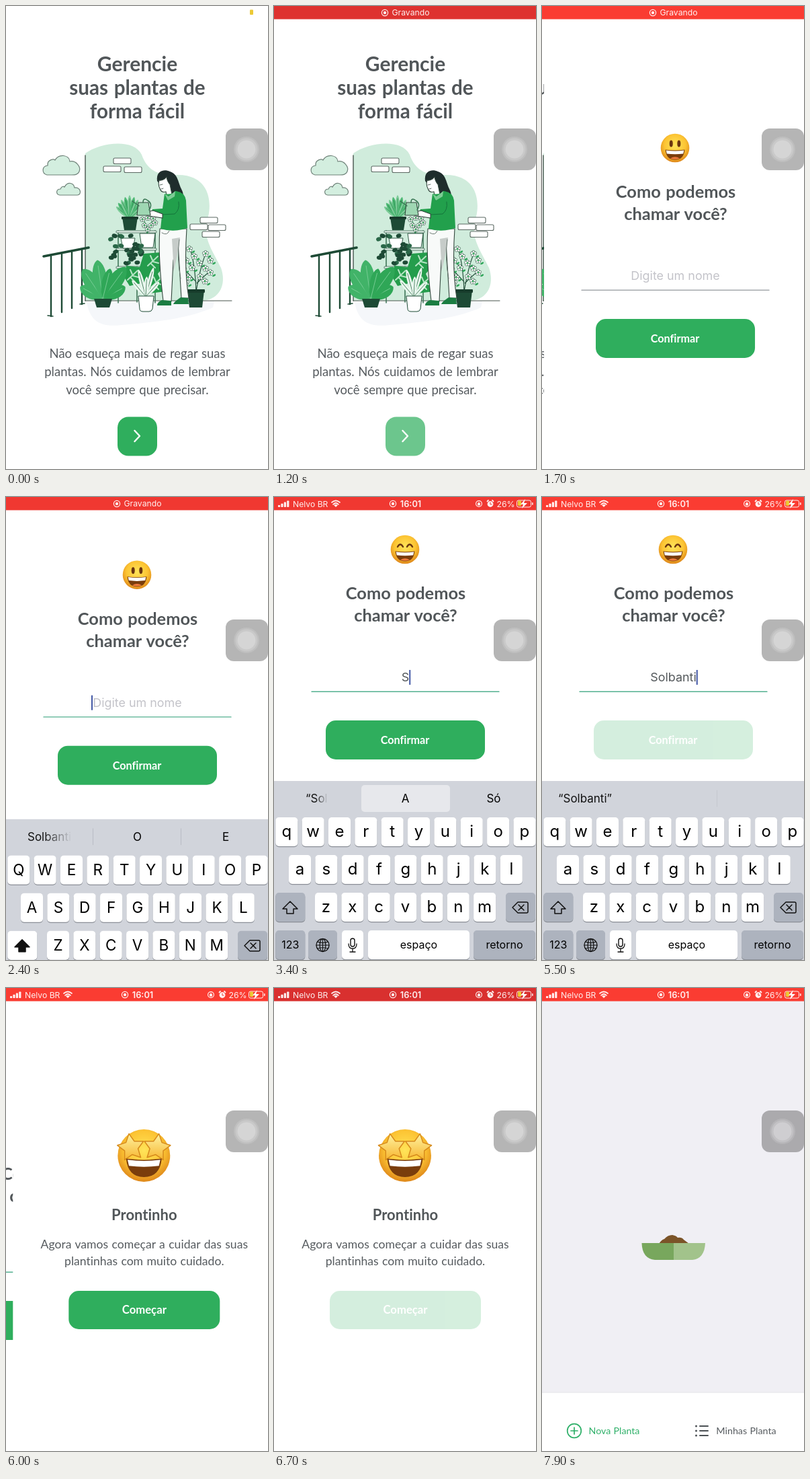
Recreate the animation shown at these times as an HTML page. Size 390 by 688 pixels, loop 8000 ms.

```html
<!DOCTYPE html>
<html lang="pt-BR">
<head>
<meta charset="utf-8">
<title>Plantas</title>
<style>
html, body { margin: 0; width: 100%; height: 100%; overflow: hidden; background: #fff }
svg { display: block; width: 100vw; height: 100vh }
text { font-family: Inter, "Noto Sans", sans-serif; text-anchor: middle }
.geo { font-family: Lato, "Open Sans", sans-serif; font-variant-ligatures: none; word-spacing: .05em; fill: #565b5f }
.bold { font-weight: 700; fill: #515659 }
.btn { font-weight: 700; fill: #fff }
.green { fill: #2fb069 }
.start { text-anchor: start }
</style>
</head>
<body>
<svg id="stage" viewBox="0 0 390 688" xmlns="http://www.w3.org/2000/svg"></svg>
<script>
const GREEN = '#2fae5d', DARK = '#1d4a35', NAME = 'Solbanti';
const stage = document.getElementById('stage');

// Markup helpers
const rect = (x, y, w, h, r, fill, more = '') =>
  `<rect x="${x}" y="${y}" width="${w}" height="${h}" rx="${r}" fill="${fill}" ${more}/>`;
const circle = (x, y, r, fill, more = '') => `<circle cx="${x}" cy="${y}" r="${r}" fill="${fill}" ${more}/>`;
const oval = (x, y, rx, ry, fill, more = '') =>
  `<ellipse cx="${x}" cy="${y}" rx="${rx}" ry="${ry}" fill="${fill}" ${more}/>`;
const path = (d, fill, more = '') => `<path d="${d}" fill="${fill}" ${more}/>`;
const line = (d, color, w = 1, more = '') =>
  `<path d="${d}" fill="none" stroke="${color}" stroke-width="${w}" stroke-linecap="round" stroke-linejoin="round" ${more}/>`;
const text = (s, x, y, size, more = '') => `<text x="${x}" y="${y}" font-size="${size}" ${more}>${s}</text>`;
const geo = (s, x, y, size, style = '') => text(s, x, y, size, `class="geo ${style}"`);
const group = (id, body, more = '') => `<g id="${id}" ${more}>${body}</g>`;
const button = (id, x, y, w, h, r, body) => group(id, rect(x, y, w, h, r, GREEN) + body);
const page = (id, bg, body) => group(id, rect(0, 0, 390, 688, 0, bg) + body);

function leaf(x, y, angle, len, width, fill, vein) {
  const d = `M0 0C${-width} ${-len * .35} ${-width * .8} ${-len * .9} 0 ${-len}C${width * .8} ${-len * .9} ${width} ${-len * .35} 0 0Z`;
  return `<g transform="translate(${x} ${y}) rotate(${angle})">${path(d, fill)}` +
    (vein ? line(`M0 0V${-len * .85}`, vein, .8) : '') + '</g>';
}

function flower(x, y, r = 2.3) {
  let s = '';
  for (let i = 0; i < 5; i++) {
    const a = i * Math.PI * .4;
    s += circle(x + r * Math.sin(a), y - r * Math.cos(a), r * .75, '#fff', `stroke="${DARK}" stroke-width=".6"`);
  }
  return s + circle(x, y, r * .5, '#37b45f');
}

function random(seed) {
  return () => (seed = seed * 16807 % 2147483647) / 2147483647;
}

function scenery() {
  const cloud = d => path(d, '#d3eedf', 'stroke="#6f8279" stroke-width="1.2"');
  const brick = ([x, y]) => rect(x, y, 26, 8.5, 2, '#fff', 'stroke="#5b6862" stroke-width="1.1"');
  const posts = [[67, 370, 461], [83, 367, 455], [98, 364, 449], [113, 361, 443]];
  return path('M120 440C125 468 140 478 172 474C215 470 268 466 308 448L310 439Z', '#f5f7fa') +
    path('M118 219C140 203 190 196 202 221C211 246 228 252 256 251C300 251 307 287 301 313C291 344 307 362 320 389C329 415 317 438 290 438H118Z', '#d0ecdc') +
    cloud('M61 251C53 249 53 238 62 237C61 228 71 227 73 229C79 219 94 221 95 231C104 229 112 239 109 246C107 251 102 251 98 251Z') +
    cloud('M80 281C74 280 74 272 81 272C83 267 86 268 87 269C92 260 101 263 102 270C112 269 113 281 106 281Z') +
    [[160, 226], [145, 238], [176, 239], [289, 314], [274, 324], [301, 325], [292, 335]].map(brick).join('') +
    line('M118 222V438', '#46544d', 1.4) + line('M118 438H336', '#46544d') +
    posts.map(([x, a, b]) => line(`M${x} ${a}V${b}`, DARK, 2.4)).join('') +
    line('M56 372L123 359', DARK, 3.6) + line('M62 460L70 461M110 443L117 442', DARK, 1.5);
}

function shelfPlants() {
  const rnd = random(77);
  const shelf = y => rect(164, y, 60, 3, 1, '#e9f6ee', `stroke="${DARK}" stroke-width=".7"`);
  const pot = d => path(d, '#fff', `stroke="${DARK}" stroke-width=".9"`);
  let s = line('M167 334V441M222 334V441M195 387V440', '#3f7558', 1.6) + [334, 360, 387].map(shelf).join('');
  for (let i = -4; i <= 4; i++)
    s += leaf(184, 316, i * 12, 35 - Math.abs(i) * 2, 4.5, i % 2 ? '#4fb975' : '#7bcb97', '#278e4d');
  s += path('M173 314H196L193 333H176Z', DARK) + rect(172, 313, 25, 4, 1, '#173b2b') +
    line('M210 339Q211 328 205 318M210 339Q214 325 219 316M210 339V326', '#25894a');
  [[203, 317], [211, 315], [219, 316], [206, 326], [216, 326], [222, 322], [211, 332]].forEach(p => s += flower(...p));
  s += pot('M199 338H222L219 359H202Z') + pot('M171 345H192L189 360H174Z');
  // trailing vine
  for (let i = 0; i < 38; i++) {
    const x = +(156 + rnd() * 46).toFixed(1), y = +(341 + rnd() * 42).toFixed(1);
    const tilt = Math.round(rnd() * 60 - 30);
    if (Math.abs(x - 181) > 8 || y < 347 || y > 361)
      s += oval(x, y, 4, 3, i % 3 ? DARK : '#2a6848', `transform="rotate(${tilt} ${x} ${y})"`);
  }
  return s;
}

function floorPlants() {
  const twig = ([x, y]) => line(`M${x - 8} ${y + 6}L${x + 7} ${y - 8}M${x} ${y}L${x - 4} ${y - 9}M${x} ${y}L${x + 8} ${y + 2}M${x - 3} ${y + 3}L${x + 3} ${y + 9}`, '#b5e4c4', 2);
  let s = path('M179 386L199 388L205 368L231 366L233 389L226 398L238 424L214 427L205 411L184 416L176 403Z', '#249d4c') +
    [[189, 401], [219, 380], [224, 412]].map(twig).join('');
  [[-62, 38, 14], [62, 38, 14], [-34, 53, 16], [36, 58, 16], [-8, 58, 15], [14, 46, 11]]
    .forEach(([a, l, w], i) => s += leaf(144, 435, a, l, w, i % 2 ? '#2fa757' : '#41b368', '#7fd09b'));
  s += path('M131 435H158L154 448H135Z', DARK);
  [[-40, 32], [-15, 42], [15, 45], [42, 30], [3, 30]].forEach(([a, l]) => s += leaf(208, 432, a, l, 5, '#eaf7ef', '#37734f'));
  s += path('M197 431H220L218 450Q217 454 213 454H204Q199 454 199 450Z', '#fff', `stroke="${DARK}" stroke-width="1"`) +
    line('M283 424Q282 390 275 363M283 424Q290 385 297 369M283 410Q272 398 264 390M284 412Q295 401 304 394M281 392L268 378', DARK, 1.1);
  [[273, 361], [280, 372], [297, 368], [268, 378], [288, 382], [304, 378], [264, 391], [277, 389], [297, 390], [304, 396], [271, 403], [289, 402], [268, 411], [296, 409]]
    .forEach(([x, y]) => s += flower(x, y, 2.7) + leaf(x + 3, y + 6, 60, 6, 2, '#2ca557'));
  return s + path('M270 423H295L292 448H273Z', DARK) + rect(269, 421, 27, 5, 1, '#173b2b');
}

function woman() {
  const ink = 'stroke="#33473d" stroke-width="1.1"';
  return path('M229 331Q226 372 234 438L246 439L249 378L256 352L261 434L272 434Q265 390 269 331Z', '#f8faf9', ink) +
    path('M247 346L259 344Q255 374 249 395L249 380Z', '#c6ccc9') + line('M258 347Q254 375 260 405M232 337Q240 342 243 334', '#6b7972', 1) +
    path('M232 437L246 438V445H225Q225 440 232 437Z', '#1b7d42') + path('M260 433L271 434L272 443H249Q251 439 260 433Z', '#1b7d42') +
    path('M225 260C223 244 236 242 244 246C257 250 256 264 262 274C267 284 260 290 249 287L240 279Z', '#1f2d2c') +
    path('M228 259Q226 266 229 271Q231 278 238 276L239 281L247 280L244 265Q240 261 239 254Q234 260 228 259Z', '#fff', ink) +
    line('M229 266l4 -1M231 272l3 -1', '#33473d', .8) +
    path('M236 279Q247 281 252 275Q266 276 268 289L270 330Q250 337 230 331L232 312L216 309L218 302L233 301Z', '#22a04c') +
    line('M233 310L251 309Q259 303 257 291M245 281L241 289', '#14743a') +
    path('M236 279L242 283L252 275L251 283L241 289Z', '#7ccc95') +
    path('M219 304L210 306L211 312L220 313L233 315V309Z', '#fff', ink) +
    path('M197 292H212L215 311H195Z', '#9fd7b3', ink) +
    line('M198 297L188 290M204 292Q204 284 211 289Q219 294 213 303', '#397653', 1.5);
}

function face(eyes, tongue = true) {
  return circle(0, 0, 21.3, 'url(#skin)') + eyes +
    path('M-14.5 2.5Q0 4.500 14.5 2.5Q13 17.5 0 17.5Q-13 17.5 -14.5 2.5Z', '#7a3d0c') +
    path('M-13.300 3.4Q0 5.4 13.3 3.4L12.2 8.4Q0 10 -12.2 8.4Z', '#fff') +
    (tongue ? path('M-7 15.500Q0 11 7 15.5Q0 18 -7 15.5Z', '#ef7a3c') : '');
}

function star(x) {
  let d = '';
  for (let i = 0; i < 10; i++) {
    const r = i % 2 ? 5.8 : 11.3, a = i * Math.PI / 5 + Math.sign(x) * .15;
    d += `${i ? 'L' : 'M'}${(x + r * Math.sin(a)).toFixed(1)} ${(-6.5 - r * Math.cos(a)).toFixed(1)}`;
  }
  return path(d + 'Z', 'url(#gold)', 'stroke="#d68a1c" stroke-width=".8" stroke-linejoin="round"');
}

const STEP = 39.35;
function key(x, y, w, label, size = 16, special = false) {
  const letter = label.length === 1;
  return rect(x, y + 1.2, w, 43, 5, '#8b8f97') + rect(x, y, w, 43, 5, special ? '#adb3be' : '#fff') +
    text(label, x + w / 2, y + (letter ? 29 : 27), size, letter ? 'class="letter"' : '');
}

function keyboard() {
  const row = (letters, x, y) => [...letters].map((c, i) => key(x + i * STEP, y, 33, c, 24)).join('');
  return rect(0, 422, 390, 266, 0, '#d1d4db') +
    rect(130, 428, 132, 40, 5, '#e7e8ec', 'id="pick"') +
    line('M129.5 494V518', '#b9bcc4', 1, 'id="dividerA" transform="translate(0 -58)"') +
    line('M260.5 436V460', '#b9bcc4', 1, 'id="dividerB"') +
    text('', 32, 454, 17, 'id="hint0" class="start" fill="url(#fade)"') +
    text('', 195.5, 454, 17, 'id="hint1"') + text('', 327, 454, 17, 'id="hint2"') +
    row('qwertyuiop', 2.3, 476) + row('asdfghjkl', 22, 532) + row('zxcvbnm', 61, 588) +
    key(2.3, 588, 44, '', 16, true) + rect(2.3, 588, 44, 43, 5, '#fff', 'id="shiftOn"') +
    path('M24 601L35 612H29V619H19V612H13Z', 'none', 'id="shift" stroke="#111" stroke-width="1.5" stroke-linejoin="round"') +
    key(345, 588, 44, '', 16, true) +
    line('M363 602H376Q378 602 378 604V616Q378 618 376 618H363L355 610ZM364 606L372 614M372 606L364 614', '#111', 1.5) +
    key(2.3, 644, 44, '123', 16, true) + key(51, 644, 43, '', 16, true) + key(101, 644, 32, '') +
    key(140, 644, 151, 'espaço') + key(297, 644, 92, 'retorno', 16, true) +
    circle(72.5, 666, 9.5, 'none', 'stroke="#111" stroke-width="1.3"') +
    oval(72.5, 666, 4.4, 9.5, 'none', 'stroke="#111" stroke-width="1.2"') +
    line('M63 666H82M72.5 657V675M65 661Q72.5 664 80 661M65 671Q72.5 668 80 671', '#111', 1.1) +
    rect(114, 656, 6, 12, 3, 'none', 'stroke="#111" stroke-width="1.4"') +
    line('M111 664Q111 671 117 671Q123 671 123 664M117 672V676M113 676H121', '#111', 1.3);
}

function statusBar() {
  const w = 'rgba(255,255,255,.92)';
  const ring = (x, r) => circle(x, 10, r, 'none', `stroke="${w}" stroke-width="1.2"`);
  const dot = x => ring(x, 4.6) + circle(x, 10, 2.2, w);
  return rect(0, 0, 390, 19.6, 0, '#f23a32', 'id="bar"') +
    group('recording', dot(165) + text('Gravando', 203.5, 14.3, 12.2, `fill="${w}"`)) +
    group('details',
      [0, 1, 2, 3].map(i => rect(6 + i * 4.4, 12 - i * 2.2, 3.2, 3 + i * 2.2, .8, w)).join('') +
      text('Nelvo BR', 28, 14.6, 12.2, `class="start" fill="${w}"`) +
      line('M86 8Q92 3 98 8M88 11Q92 7 96 11', w, 1.7) + path('M89 12Q92 10 95 12L92 15Z', w) +
      dot(177) + text('16:01', 203.5, 14.6, 12.8, `font-weight="600" fill="${w}"`) +
      ring(305, 4.4) + rect(303, 9, 4, 3.4, .6, w) + line('M304 9Q305 5.5 306 9', w, .8) +
      circle(322, 10.5, 4.4, w) + line('M317.5 6.5L319 5M326.5 6.5L325 5', w, 1.8) + line('M322 8V11H324', '#e8413a') +
      text('26%', 345, 14.5, 12.3, `fill="${w}"`) +
      rect(361.5, 5, 21, 10, 2.5, 'none', `stroke="${w}" stroke-width="1"`) + rect(384, 8, 1.6, 4, .8, w)) +
    rect(363, 5.5, 5, 7.5, 1, '#ecc935', 'id="charge"') +
    path('M374 3L367 11H371L369 17L377 9H372Z', '#fff', 'id="bolt"');
}

const brown = '#6b3510';
const openEyes = oval(-5.8, -6.5, 2.5, 5, brown) + oval(5.8, -6.5, 2.5, 5, brown);
const closedEyes = line('M-11 -4Q-7 -11 -3 -4M3 -4Q7 -11 11 -4', brown, 2.4);
const listRow = y => circle(229.5, y, 1.5, '#4b5054') + line(`M235 ${y}H247`, '#4b5054', 2);

stage.innerHTML = `<defs>
  <radialGradient id="skin" cx=".5" cy=".4" r=".62"><stop offset="0" stop-color="#ffe459"/><stop offset=".6" stop-color="#fcc433"/><stop offset="1" stop-color="#dc8218"/></radialGradient>
  <linearGradient id="gold" x2="0" y2="1"><stop stop-color="#fff3a2"/><stop offset="1" stop-color="#f6b52f"/></linearGradient>
  <linearGradient id="fade" gradientUnits="userSpaceOnUse" y2="0"><stop stop-color="#111"/><stop offset="1" stop-color="#111" stop-opacity="0"/></linearGradient>
</defs>` +
page('welcome', '#fff',
  geo('Gerencie', 195.5, 97, 30, 'bold') + geo('suas plantas de', 195.5, 132, 29.6, 'bold') + geo('forma fácil', 195.5, 167, 29.6, 'bold') +
  scenery() + shelfPlants() + floorPlants() + woman() +
  geo('Não esqueça mais de regar suas', 195.5, 523, 18.5) + geo('plantas. Nós cuidamos de lembrar', 195.5, 550, 18.5) +
  geo('você sempre que precisar.', 195.5, 577, 18.5) +
  button('next', 166, 610.5, 59, 58, 16, line('M191.5 631L199 639L191.5 647', '#fff', 2.4))) +
page('naming', '#fff',
  group('form',
    group('smile', face(openEyes), 'transform="translate(195 78)"') +
    group('laugh', face(closedEyes), 'transform="translate(195 78)"') +
    geo('Como podemos', 196, 152, 25.4, 'bold') + geo('chamar você?', 196, 185, 25.4, 'bold') +
    text('Digite um nome', 195.5, 274, 17.9, 'id="placeholder" fill="#c3c3c9"') +
    text('', 195.5, 274, 17.9, 'id="typed" fill="#54595c"') +
    rect(0, 257, 2, 22, 0, '#4257a5', 'id="caret"') +
    line('M56 289.2H335', '#52b08f', 1.4, 'id="underline"') +
    button('confirm', 77, 332, 237, 58, 15, geo('Confirmar', 195, 367, 16.2, 'btn'))) +
  group('keys', keyboard())) +
page('ready', '#fff',
  group('starry', face(star(-10.5) + star(10.5), false), 'transform="translate(195 249) scale(1.83)"') +
  geo('Prontinho', 195.5, 345, 22, 'bold') +
  geo('Agora vamos começar a cuidar das suas', 195.5, 386.5, 17.6) + geo('plantinhas com muito cuidado.', 195.5, 412, 17.6) +
  button('begin', 83, 450, 225, 57, 15, geo('Começar', 195.5, 484, 16.7, 'btn'))) +
page('loading', '#f0eff4',
  path('M174 380Q178 374 182 373Q187 367 194 367Q200 368 202 371Q208 370 211 374L219 380Z', '#7b5428', 'id="soil"') +
  path('M148.5 379H196V404H168Q149 402 148.5 379Z', '#78a75d') + path('M196 379H243Q242 402 224 404H196Z', '#a2c38b') +
  rect(0, 601, 390, 87, 0, '#fff') + line('M0 601H390', '#e3e3e7') +
  circle(48, 658, 10.3, 'none', 'stroke="#2fb069" stroke-width="1.7"') + line('M43 658H53M48 653V663', '#2fb069', 1.7) +
  geo('Nova Planta', 107.5, 663, 14.2, 'green') +
  [651, 658, 665].map(listRow).join('') + geo('Minhas Planta', 304, 663, 14.3)) +
statusBar() +
group('assist', rect(327, 182, 63, 62, 12, 'rgba(0,0,0,.29)') +
  circle(358, 213, 19, 'rgba(255,255,255,.13)') + circle(358, 213, 16.5, 'rgba(255,255,255,.16)') + circle(358, 213, 13.5, 'rgba(255,255,255,.22)'));

const ui = {};
stage.querySelectorAll('[id]').forEach(el => ui[el.id] = el);
const letters = [...stage.querySelectorAll('.letter')];

const set = (el, name, value) => el.setAttribute(name, value);
const show = (el, on) => el.style.display = on ? '' : 'none';
const write = (el, s) => { if (el.textContent !== s) el.textContent = s; };
const progress = (t, from, length) => Math.min(1, Math.max(0, (t - from) / length));
const easeOut = (p, power = 3) => 1 - (1 - p) ** power;
const shift = (el, x, y = 0) => set(el, 'transform', `translate(${x.toFixed(2)} ${y.toFixed(2)})`);

function press(el, t, down, up, low) {
  const amount = progress(t, down, 130) - progress(t, up, 250);
  set(el, 'opacity', 1 - (1 - low) * amount);
}

function hints(t, word) {
  const early = t < 3300, first = !early && t < 3550;
  let left = `“${word}”`, x = 65 - left.length * 4.1, fade = [300, 390];
  if (early) [left, x, fade] = [NAME, 32, [55, 98]];
  else if (first) [left, x, fade] = ['“' + NAME.slice(0, 3), 47, [62, 80]];
  write(ui.hint0, left);
  set(ui.hint0, 'x', x);
  set(ui.fade, 'x1', fade[0]);
  set(ui.fade, 'x2', fade[1]);
  write(ui.hint1, early ? 'O' : first ? 'A' : '');
  write(ui.hint2, early ? 'E' : first ? 'Só' : '');
  show(ui.pick, first);
  show(ui.dividerA, early);
  show(ui.dividerB, !first);
  set(ui.dividerB, 'opacity', early ? 1 : .5);
}

function setCase(caps) {
  letters.forEach(el => {
    write(el, caps ? el.textContent.toUpperCase() : el.textContent.toLowerCase());
    set(el, 'font-size', caps ? 22.5 : 24);
  });
  set(ui.shift, 'fill', caps ? '#111' : 'none');
  show(ui.shiftOn, caps);
}

function drawStatus(t) {
  const pulse = Math.min(1, .65 * (1 - Math.cos((t - 1000) / 1900 * 2 * Math.PI)));
  const mix = (a, b) => Math.round(a + (b - a) * pulse);
  const timeShown = t >= 2900;
  set(ui.bar, 'fill', `rgb(${mix(217, 250)},${mix(48, 60)},${mix(47, 50)})`);
  set(ui.bar, 'opacity', progress(t, 200, 200));
  show(ui.recording, t >= 200 && !timeShown);
  show(ui.details, timeShown);
  show(ui.charge, timeShown || t < 200);
  show(ui.bolt, timeShown);
}

function draw(t) {
  // pages push in from the right
  const pages = [ui.welcome, ui.naming, ui.ready, ui.loading];
  const pushes = [1300, 5650, 6850].map(start => easeOut(progress(t, start, 500)));
  pages.forEach((el, i) => {
    const inward = i ? pushes[i - 1] : 1, outward = i < 3 ? pushes[i] : 0;
    show(el, inward > 0 && outward < 1);
    shift(el, 390 * (1 - inward) - 117 * outward);
  });

  press(ui.next, t, 1000, 1260, .7);
  press(ui.confirm, t, 5300, 5600, .2);
  press(ui.begin, t, 6500, 6800, .2);

  const rise = progress(t, 2300, 251), fall = easeOut(progress(t, 5650, 250));
  shift(ui.keys, 0, 266 * Math.max(1 - easeOut(rise), fall));
  shift(ui.form, 0, 133 * Math.max(1 - easeOut(rise, 2.45), fall));

  const count = t < 3300 ? 0 : Math.min(NAME.length, 1 + Math.floor((t - 3300) / 200));
  const word = NAME.slice(0, count), focused = t >= 2250;
  write(ui.typed, word);
  show(ui.placeholder, !count);
  show(ui.smile, !count);
  show(ui.laugh, count);
  set(ui.underline, 'stroke', focused ? '#52b08f' : '#a5a9ad');
  show(ui.caret, focused && t < 5650);
  set(ui.caret, 'x', count ? 195.5 + ui.typed.getComputedTextLength() / 2 : 127);

  setCase(!count);
  hints(t, word);
  drawStatus(t);
  shift(ui.soil, 0, 14 * (1 - easeOut(progress(t, 7500, 350))));
}

const begin = performance.now();
function tick() {
  draw((performance.now() - begin) % 8000);
  requestAnimationFrame(tick);
}
tick();
</script>
</body>
</html>
```
